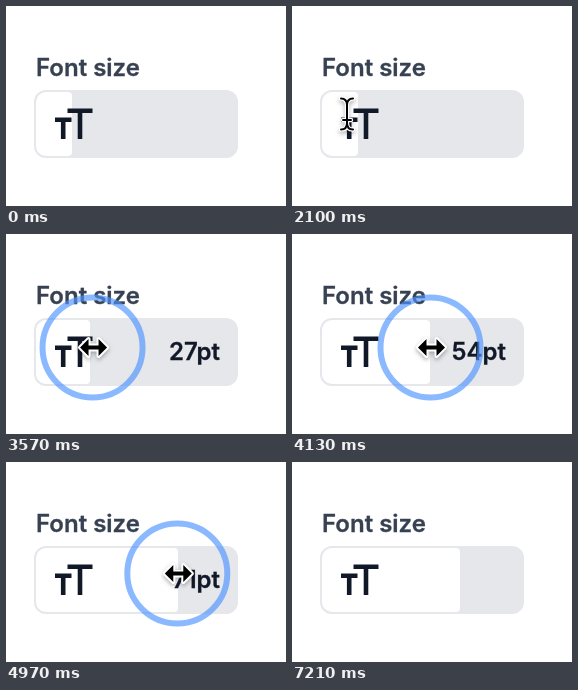
Recreate the animation shown at these times as an HTML page. Size 280 by 200 pixels, loop 7.28 s.

```html
<!DOCTYPE html>
<html lang="en">
<head>
<meta charset="utf-8">
<title>Font size slider</title>
<style>
  html, body { margin: 0; width: 100%; height: 100%; overflow: hidden; background: #fff; }
  svg { display: block; width: 280px; height: 200px; }
  text { font: 600 24px Inter, sans-serif; }
  .solid { paint-order: stroke; fill: #000; stroke: #fff; stroke-width: 4; stroke-linejoin: round; }
  #cursor { filter: drop-shadow(0 2px 2px rgba(0, 0, 0, .3)); }
  #beam { fill: none; stroke-linecap: round; }
</style>
</head>
<body>
<svg viewBox="0 0 280 200">
  <defs>
    <clipPath id="inner"><rect x="30" y="86" width="200" height="64" rx="10"/></clipPath>
    <path id="stem" d="M-6-15.5Q0-15.5 0-9V9Q0 15.5-6 15.5M6-15.5Q0-15.5 0-9M0 9Q0 15.5 6 15.5M-4 6H4"/>
  </defs>
  <text x="30" y="70" fill="#374151" stroke="#374151" stroke-width=".3">Font size</text>
  <rect x="28" y="84" width="204" height="68" rx="12" fill="#e5e7eb"/>
  <g clip-path="url(#inner)"><rect id="fill" y="86" height="64" rx="4" fill="#fff"/></g>
  <path d="M61.5 104.7H86.5M74 104.7V133M49 113.8H65.5M57.2 113.8V133" stroke="#111827" stroke-width="4.6"/>
  <text id="value" x="214" y="126" text-anchor="end" fill="#111827" stroke="#111827" stroke-width=".3"></text>
  <circle id="ring" fill="none" stroke="#4d94ff" stroke-width="6"/>
  <g id="cursor">
    <path id="arrow" class="solid" d="M.7 1.5V28L6.7 22.5L11.2 32.2L15.7 30.2L11.5 20.5H19Z"/>
    <g id="beam">
      <use href="#stem" stroke="#fff" stroke-width="4.4"/>
      <use href="#stem" stroke="#000" stroke-width="2"/>
    </g>
    <path id="resize" class="solid" d="M-13.5 0L-5-8.5V-2H5V-8.5L13.5 0L5 8.5V2H-5V8.5Z"/>
  </g>
</svg>
<script>
const LOOP = 7280, CLICK = 1510, PRESS = 3080, DRAG = 3290, RELEASE = 4990;
const $ = id => document.getElementById(id);
const set = (id, attrs) => {
  for (const key in attrs) $(id).setAttribute(key, attrs[key]);
};
const ramp = (t, from, to) => Math.min(1, Math.max(0, (t - from) / (to - from)));
const ease = (t, from, to) => {
  const u = ramp(t, from, to);
  return u * u * (3 - 2 * u);
};

// The pointer's place is the sum of its eased moves.
function pointer(t) {
  const enter = ease(t, 910, 1260);
  const settle = ramp(t, 1260, 1820), detour = Math.sin(Math.PI * settle);
  const grab = ease(t, 2200, 2450);
  const pull = ease(t, DRAG, 4090), back = ease(t, 4150, 4410), push = ease(t, 4410, 4830);
  const relax = ease(t, 4970, 5180), leave = ease(t, 6230, 6560);
  return {
    x: 70 - 20 * enter + 5 * settle + 9 * detour + 12 * grab
      + 72.5 * pull - 30.5 * back + 63.3 * push - 2.8 * relax - 41 * leave,
    y: 215 - 97 * enter - 10 * settle - 9 * detour + 5.5 * grab - 2 * push + 103.5 * leave
  };
}

// The slider trails the pointer slightly and stays put once it leaves.
function pointSize(t) {
  return t < DRAG ? 18 : Math.round((pointer(Math.min(t - 20, 5250)).x - 31) / 2);
}

function drawRing(t, { x, y }) {
  const [down, up] = t < PRESS ? [CLICK, 1750] : [PRESS, RELEASE];
  const grow = ease(t, down, down + 160), fade = ramp(t, up, up + 260);
  set('ring', { cx: x - 1, cy: y, r: 30 + 20 * grow + 19 * fade, opacity: .65 * grow * (1 - fade) });
}

function draw(t) {
  const at = pointer(t), size = pointSize(t);
  set('fill', { width: 30 + 2 * size });
  $('value').textContent = size + 'pt';
  set('value', { opacity: ramp(t, 2200, 2450) * (1 - ramp(t, 6270, 6520)) });
  drawRing(t, at);

  const shape = t < 1400 || t >= 6390 ? 'arrow' : t < 2380 ? 'beam' : 'resize';
  for (const id of ['arrow', 'beam', 'resize']) set(id, { display: id === shape ? 'inline' : 'none' });
  set('cursor', { transform: `translate(${at.x} ${at.y})` });
}

const start = performance.now();
function tick() {
  draw((performance.now() - start) % LOOP);
  requestAnimationFrame(tick);
}
tick();
</script>
</body>
</html>
```
